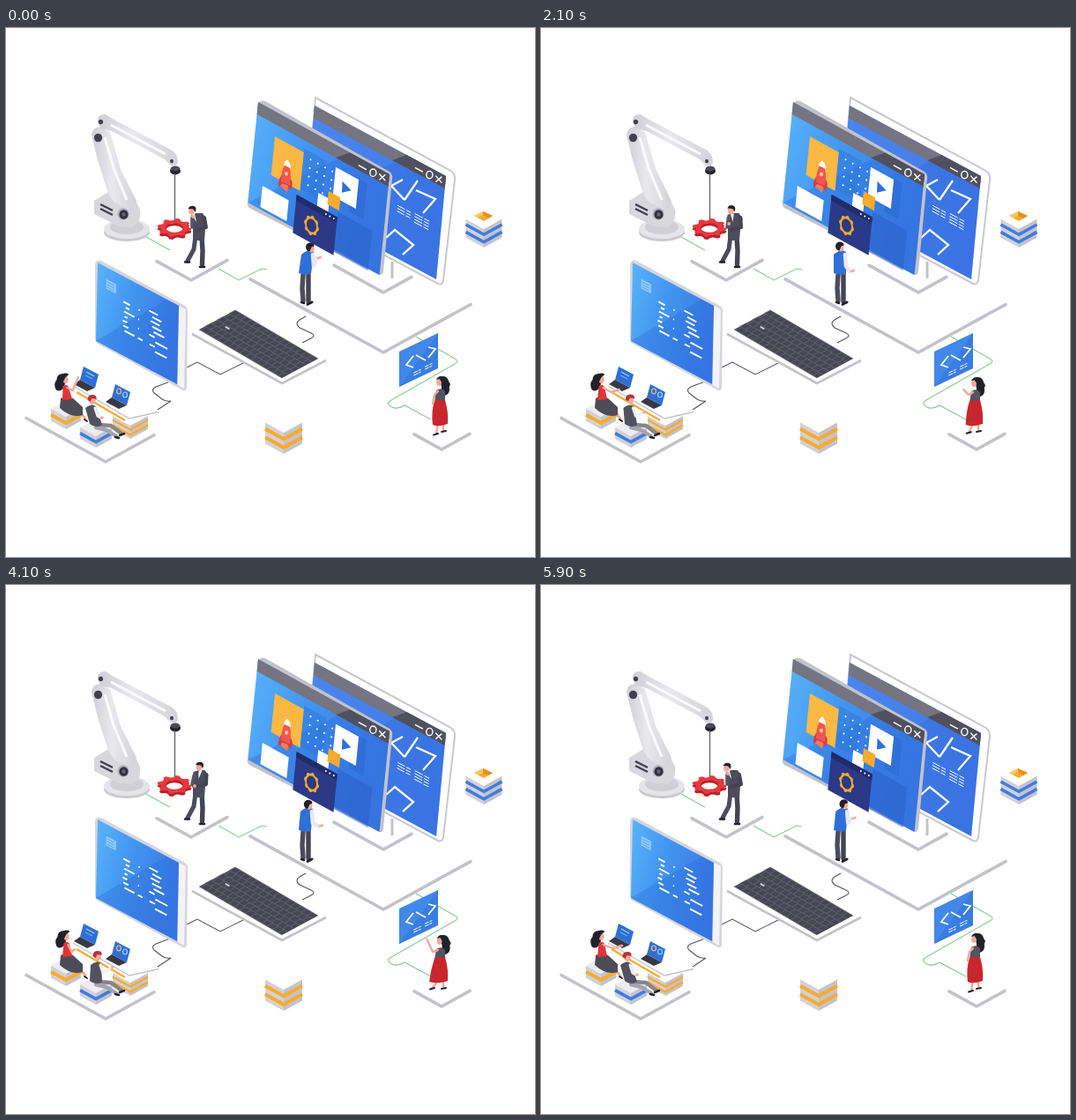
An HTML page that plays this animation: 600x600 px, repeating every 6000 ms.

```html
<!DOCTYPE html>
<html lang="en">
<head>
<meta charset="utf-8">
<title>Isometric workshop</title>
<style>
html,body{margin:0;width:100%;height:100%;overflow:hidden;background:#fff}
svg{display:block;width:100vw;height:100vh}
</style>
</head>
<body>
<svg viewBox="0 0 600 600" xmlns="http://www.w3.org/2000/svg">
<defs>
<linearGradient id="screen" x1="0" y1="0" x2="1" y2=".4"><stop offset="0" stop-color="#5ab4fb"/><stop offset=".5" stop-color="#4193ef"/><stop offset="1" stop-color="#3c7ae6"/></linearGradient>
<linearGradient id="rear"><stop offset="0" stop-color="#4a86ec"/><stop offset="1" stop-color="#4379e8"/></linearGradient>
<linearGradient id="arm"><stop offset="0" stop-color="#cfced6"/><stop offset=".45" stop-color="#e8e8ed"/><stop offset="1" stop-color="#d3d2d9"/></linearGradient>
</defs>
<g id="back"></g><g id="live"></g>
</svg>
<script>
const DARK = '#42414f', SUIT = '#4d4c5c', GREY = '#c3c2ca', WHITE = '#fff', SKIN = '#f3a999', HAIR = '#22212b', ORANGE = '#f8ab2c', BLUE = '#3f7de0';

const poly = (pts, fill, extra = '') => `<polygon points="${pts}" fill="${fill}" ${extra}/>`;
const line = (pts, color, w = 1, extra = '') =>
  `<polyline points="${pts}" fill="none" stroke="${color}" stroke-width="${w}" ${extra}/>`;
const limb = (pts, color, w) => line(pts, color, w, 'stroke-linecap="round" stroke-linejoin="round"');
const path = (d, fill, extra = '') => `<path d="${d}" fill="${fill}" ${extra}/>`;
const oval = (x, y, rx, ry, fill, extra = '') => `<ellipse cx="${x}" cy="${y}" rx="${rx}" ry="${ry}" fill="${fill}" ${extra}/>`;
const ring = (x, y, rx, ry, color, w) => oval(x, y, rx, ry, 'none', `stroke="${color}" stroke-width="${w}"`);
const wire = (d, color) => path(d, 'none', `stroke="${color}" stroke-width="1.1"`);
const range = (n, f) => Array.from({length: n}, (_, i) => f(i)).join('');

// Slanted surface: maps u, v in 0..1 to the stage
const plane = (x, y, ux, uy, vx, vy) => (u, v) => [x + ux * u + vx * v, y + uy * u + vy * v];
const rect = (at, u, v, w, h, fill, extra) =>
  poly([at(u, v), at(u + w, v), at(u + w, v + h), at(u, v + h)], fill, extra);
const dash = (at, u, v, w, size, color = WHITE) => line([at(u, v), at(u + w, v)], color, size);

function random(seed) {
  return () => (seed = seed * 16807 % 2147483647) / 2147483647;
}

// Front edge of a floor tile: corner x, y with arms to both sides
const floor = (x, y, left, right, w = 3.6) =>
  limb([x - left, y - left * .55, x, y, x + right, y - right * .55], GREY, w);

// x, y is the front corner of the top face
function cube(x, y, w, h, color, bands, top = WHITE) {
  const k = w * .55, n = bands * 2 + 1;
  return poly([x - w, y - k, x, y - 2 * k, x + w, y - k, x, y], top) +
    poly([x - w, y - k, x, y, x, y + h, x - w, y - k + h], '#d2d1d9') +
    poly([x, y, x + w, y - k, x + w, y - k + h, x, y + h], '#c4c3cc') +
    range(bands, i => {
      const v = y + h * (2 * i + 1.5) / n;
      return line([x - w, v - k, x, v, x + w, v - k], color, h / n * .85);
    });
}

function gear(x, y, rx, ry, notch, hole, fill, tilt = 0) {
  const n = 32;
  const loop = radius => 'M' + Array.from({length: n}, (_, i) => {
    const a = (i + .5) / n * 2 * Math.PI, r = radius(i), dx = Math.cos(a) * rx * r;
    return `${x + dx} ${y + Math.sin(a) * ry * r + dx * tilt}`;
  }).join('L') + 'Z';
  return path(loop(i => i % 4 < 2 ? 1 : notch) + loop(() => hole), fill, 'fill-rule="evenodd"');
}

function robot() {
  return oval(137, 232, 26, 10, '#cbcad2') + oval(137, 228, 26, 11, '#e4e4e9') + oval(137, 226, 19, 8, '#d0cfd7') +
    path('M100 196L116 186 146 194 152 206Q154 221 143 226L128 225 100 211Z', '#d8d7de') +
    path('M97 121Q98 113 106 112L118 118 130 160 148 196 143 208 123 198 116 188 104 150Z', 'url(#arm)') +
    line([112, 124, 122, 159, 137, 195], '#fafafc', 3) +
    line([107, 200, 121, 207], DARK, 2.4) + line([107, 205, 121, 212], DARK, 2.4) +
    oval(133, 211, 6.5, 6.8, '#b0afbb') + oval(133.5, 211.5, 5, 5.3, '#33323e') + oval(133.5, 211.5, 2, 2.2, '#676674') +
    path('M104 106Q104 97 113 98L121 103 187 138Q195 142 195 153 192 158 187 156L180 149 120 117 107 114Z', 'url(#arm)') +
    line([119, 110, 181, 143], '#fafafc', 3) +
    oval(104.5, 124.5, 4.6, 4.8, DARK) + oval(107.5, 106.5, 2.6, 2.8, DARK) + oval(188, 151, 2, 2.3, DARK) +
    oval(192, 162, 6, 4.4, '#24232d') + oval(192, 159.5, 5.4, 3, '#4a4957') +
    line([191.5, 165, 191.5, 219], '#5a5965', 1.2) +
    gear(191, 229.5, 19.5, 10.5, .8, .5, '#b9202a') + gear(191, 226.5, 19.5, 10.5, .8, .5, '#e6393f');
}

// Title bar, gloss and the minimise, maximise and close marks
function browser(at, fill, gloss) {
  const [ox, oy] = at(.88, .07), [cx, cy] = at(.95, .065);
  return rect(at, 0, 0, 1, 1, fill) +
    poly([at(.7, 0), at(1, 0), at(1, 1), at(0, 1)], '#2a68d6', `opacity="${gloss}"`) +
    rect(at, 0, 0, 1, .12, '#757480') + poly([at(.7, 0), at(1, 0), at(1, .12), at(.6, .12)], '#50505e') +
    dash(at, .77, .075, .06, 1.5) + ring(ox, oy, 3.6, 4.2, WHITE, 1.4) +
    path(`M${cx - 3.5} ${cy - 4}l7 8m0-7l-7 6`, 'none', 'stroke="#fff" stroke-width="1.4"');
}

const smallText = (at, u, v, w, rows, gap) =>
  range(rows, i => dash(at, u, v + i * gap, w * .55, 1) + dash(at, u + w * .65, v + i * gap, w * .35, 1));

function rearMonitor() {
  const at = plane(350, 88, 149, 80, -11, 117);
  return path('M351 79L503 161Q510 165 509 172L496 286Q495 292 490 290L340 210Z', WHITE, 'stroke="#c9c8d0" stroke-width="2"') +
    browser(at, 'url(#rear)', .35) +
    line([450, 172, 437, 179, 452, 195], WHITE, 2.3) + line([452, 195, 467, 173], WHITE, 2.3) +
    line([465, 184, 487, 194, 473, 210], WHITE, 2.3) +
    smallText(at, .67, .51, .1, 3, .027) + smallText(at, .8, .5, .11, 4, .027) +
    line([431, 238, 441, 229, 462, 246, 450, 257], WHITE, 2.3);
}

function frontMonitor() {
  const at = plane(286, 84, 149, 82, -11.5, 114), shade = 'opacity=".5"';
  return line([438, 265, 438, 284], GREY, 3) + floor(428, 300, 56, 32) +
    path('M286 87Q288 81 294 83L435 163Q439 166 438 171L428 276Q427 282 421 279L276 204Q273 202 274 198Z', GREY) +
    browser(at, 'url(#screen)', .35) +
    rect(at, .366, .2, .17, .4, '#2d78dc', shade) + rect(at, .735, .2, .11, .36, '#2a66cf', shade) +
    rect(at, .655, .62, .26, .4, '#285fc7', shade) +
    rect(at, .146, .236, .22, .385, '#fbb843') +
    range(16, i => oval(...at(.42 + i % 4 * .055, .27 + (i >> 2) * .085), 1, 1.1, WHITE)) +
    rect(at, .607, .21, .175, .29, WHITE) + poly([at(.665, .31), at(.735, .35), at(.67, .42)], '#2f70dd') +
    rect(at, .092, .767, .2, .21, WHITE) +
    rect(at, .5, .543, .085, .13, WHITE) + rect(at, .573, .474, .09, .13, ORANGE) +
    rect(at, .345, .673, .31, .38, '#2b3986') + rect(at, .345, .673, .31, .06, '#202c6c') +
    range(3, i => oval(...at(.57 + i * .03, .705), 1, 1.1, WHITE));
}

function leftScreen() {
  const at = plane(104, 266, 92, 49, -2, 89), rnd = random(12);
  return path('M101 268Q102 262 108 264L203 315Q206 317 206 321L205 408Q204 413 199 410L104 358Q101 356 101 352Z', '#d6d5dd') +
    poly([196, 315, 204, 319, 202, 409, 195, 405], '#f3f3f7') +
    rect(at, 0, 0, 1, 1, 'url(#screen)') +
    poly([at(.85, 0), at(1, 0), at(1, 1), at(0, 1)], '#2a6bd8', 'opacity=".35"') +
    rect(at, .11, .15, .12, .12, '#a9d5ff', 'opacity=".75"') +
    range(3, i => dash(at, .12, .18 + i * .033, .09, .8, '#4a9cf3')) +
    range(9, i => {
      const v = .26 + i * .06;
      return dash(at, .64 + rnd() * .1, v, .05 + rnd() * .1, 1.9) +
        (i < 7 ? dash(at, .32 + rnd() * .06, v + .06, .03 + rnd() * .1, 1.9) : '') +
        (i % 2 ? dash(at, .51, v, .1 * rnd(), 1.9) : '');
    });
}

function keyboard() {
  const at = plane(260, 320, 94, 55, -41, 22);
  return line([211, 347, 313, 403, 363, 377], GREY, 2.6) + rect(at, 0, 0, 1, 1, '#474653') +
    range(7, r => line([at(0, r / 6), at(1, r / 6)], '#6b6a77', .7)) +
    range(90, i => {
      const r = i % 6, u = (i / 6 | 0) / 15 + r % 2 * .02;
      return line([at(u, r / 6), at(u, (r + 1) / 6)], '#6b6a77', .7);
    }) + dash(at, .12, .55, .05, 1.6, '#d9d8df');
}

// x, y is the top left corner of the lid
function laptop(x, y) {
  const at = plane(x, y, 17, 9, -4, 15);
  return poly([at(0, 1), at(1, 1), [x + 4, y + 28], [x - 11, y + 20]], '#393845') + rect(at, 0, 0, 1, 1, '#2f6fd4');
}

function desk() {
  return cube(141, 451, 20, 15, ORANGE, 2) +
    poly([76, 405, 95, 397, 173, 435, 141, 447], WHITE) + line([80, 413, 135, 445], ORANGE, 2.2) +
    line([76, 406, 140, 443, 173, 435.5], GREY, 1.4) +
    laptop(88, 384) + line([91, 390, 100, 395], '#9fd0ff', 1.2) + line([90, 394, 98, 398], '#7db9f5') +
    laptop(124, 404) + ring(128, 412, 2.4, 3, '#e9c27b', 1.2) + ring(135, 416, 2.4, 3, '#9fd0ff', 1.2);
}

function panel() {
  const at = plane(446, 367, 44, -21, 0, 40);
  return rect(at, 0, 0, 1, 1, '#4288ea') + poly([at(1, 0), at(1, 1), at(0, 1)], '#2b6bd4', 'opacity=".4"') +
    line([462, 372, 454, 382, 462, 385], WHITE, 1.8) + line([465, 371, 476, 377], WHITE, 1.8) +
    line([479, 362, 487, 364, 479, 374], WHITE, 1.8) +
    smallText(at, .37, .8, .19, 2, .07) + smallText(at, .66, .78, .19, 2, .07);
}

function scenery() {
  const GREEN = '#86cb95', INK = '#55545f';
  return wire('M159 237L186 252M241 273L264 286 290 273 296 274', GREEN) +
    floor(210, 286, 39, 41) + floor(428, 368, 151, 99) + floor(113, 492, 90, 55) + floor(494, 478, 31, 32) +
    wire('M465 350L509 375Q515 378 509 381L437 422Q430 426 438 430 443 433 452 428L482 444', GREEN) +
    wire('M205 385L217 379 243 393 269 380', INK) +
    wire('M340 327L333 331Q327 335 333 340L346 346Q352 349 346 352L336 357', INK) +
    wire('M186 401L170 407Q164 410 168 414L177 421Q182 424 187 423L172 433', INK) +
    robot() + rearMonitor() + frontMonitor() + leftScreen() + keyboard() + desk() +
    cube(68, 441, 17, 14, ORANGE, 1, '#ededf1') + cube(102, 463, 18, 13, BLUE, 1, '#ededf1') +
    cube(315, 459, 21, 24, ORANGE, 2) + panel();
}

const CYCLE = 3000;
function ramp(t, from, to) {
  const u = Math.min(1, Math.max(0, (t - from) / (to - from)));
  return u * u * (3 - 2 * u);
}

// Shared beats of the gestures, each 0..1
function beats(t) {
  t %= CYCLE;
  const leave = ramp(t, 1600, 2700), begin = ramp(t, 0, 600), next = ramp(t, 600, 1400);
  return {
    act: begin - leave,
    reach: next - leave,
    lean: begin - next,
    rise: 1 - begin + ramp(t, 2700, 3000),
    wave: 1 - begin + ramp(t, 2900, 3000),
    type: ramp(t, 600, 2700) - ramp(t, 2900, 3000)
  };
}

function boss({act}) {
  const x = 211 + 8.5 * act, y = 206 - act, sx = 218 + 2.5 * act, hx = 212 + 2 * act, hy = 214 + 14 * act;
  return limb([215, 236, 213, 251, 206, 264], SUIT, 5) + limb([222, 236, 223, 253, 222.5, 268], '#454453', 5.4) +
    limb([203, 265.5, 208, 265.5], HAIR, 2.4) + limb([220, 271, 225, 271], HAIR, 2.6) +
    poly([sx - 8, 212, sx - 2, 210, sx + 5, 210, sx + 9, 216, 226, 228, 225, 242, 212, 240, 212, 226], SUIT) +
    poly([x - 1, y + 5, x + 3, y + 5, sx - 2, 220], WHITE) +
    limb([sx + 7, 215, 227, 226, 216, 229], '#454453', 4) + limb([sx - 7, 215, 211, 226, hx, hy + 2], '#565565', 3.6) +
    oval(hx, hy, 1.9, 2, SKIN) + oval(x - .6, y + 1.5, 3.2, 4.2, SKIN) +
    path(`M${x - 4.5} ${y - 1}q2-4.500 7-3 3.500 2 1 7l-2-3.500z`, HAIR);
}

function maker({lean, rise}) {
  const x = 339 + 12 * lean + 6 * rise, y = 247 + 4 * lean + rise, sx = 340 + (x - 339) * .5;
  const hx = 355 + 13 * lean + 2 * rise, hy = 275 - 8 * lean - 15 * rise;
  return limb([337, 280, 336, 295, 337, 309], SUIT, 5.4) + limb([343, 280, 343, 296, 343, 310], '#454453', 5.4) +
    limb([335, 311, 338, 312], HAIR, 2.6) + limb([342, 313.5, 347, 311], HAIR, 2.8) +
    path(`M${sx - 8} 257Q${sx} 250 ${sx + 6} 254L346 279Q339 281 332 278Z`, '#2f6fd8') +
    limb([sx + 5, 257, sx + 6, 270, hx - 5, hy + 1], '#e8e8f2', 4.6) + limb([hx - 3, hy + 1, hx, hy], SKIN, 2.6) +
    oval(x + 1, y + 2, 3.6, 4.4, SKIN) + path(`M${x - 5} ${y}q1-5 6-4.500 4 1 3.500 4l-3 1-2 5q-4 0-4.500-5z`, HAIR);
}

function coder({act, reach, lean}) {
  const x = 493 + 2 * lean, y = 401 + 2 * act, hx = 484 - 4 * act - 4 * reach, hy = 426 - 16 * act - 12 * reach;
  const lx = 488 - 4 * act, ly = 460 - 3 * act;
  return limb([490, 448, lx, ly], SKIN, 2.4) + limb([496, 448, 496, 456], SKIN, 2.4) +
    limb([lx - 3, ly + 1.5, lx + 2, ly], HAIR, 2) + limb([494, 458, 499, 457], HAIR, 2) +
    path(`M${x - 2} ${y - 5}q7-3 10 2 1 3 3 6-2 3-1 6 0 5-5 7-5-1-4-10z`, HAIR) +
    path(`M488 ${y + 10}Q494 ${y + 6} 498 ${y + 11}L498 425 486 425Z`, '#55535f') +
    path(`M486 423L498 422Q502 436 501 449 490 453 ${484 - 4 * act} 450 482 436 486 423Z`, '#c9252d') +
    limb([490, y + 11, 486 - 2 * act, 416, hx, hy], SKIN, 2.4) +
    oval(x - 2, y + 1, 2.9, 4, SKIN) + path(`M${x - 5} ${y - 2}q3-6 8-3l1 6q-4 0-5-4z`, HAIR);
}

function girl({wave, type}) {
  const x = 66.5 - wave, y = 398, hx = 76 + 6 * wave + 16 * type, hy = 414 - 18 * wave - 5 * type;
  return limb([84, 436, 90, 443], SKIN, 3) + limb([89, 444, 92, 446], HAIR, 2) +
    path(`M${x} ${y - 6}q-8 0-8 7-4 4-1 11 4 4 9-2l4-12z`, HAIR) +
    path('M62 420Q69 416 76 420L87 430 87 439Q74 443 61 431Z', '#4d4b58') +
    path(`M${x - 1} 406Q${x + 5} 403 ${x + 6} 409L75 421 64 422Z`, '#df3538') +
    limb([x + 4, 408, (x + hx) / 2 + 2, Math.max(hy + 3, 411), hx, hy], SKIN, 2.4) +
    oval(x + 2, y + 1, 3, 4, SKIN) + path(`M${x - 4} ${y - 2}q4-7 10-3l-4 3-3 6z`, HAIR);
}

function boy({act, reach}) {
  const x = 97 + 6 * act, y = 421 - act, hx = 108 + 7 * act + 7 * reach, hy = 442 - 4 * act - 7 * reach;
  return limb([104, 450, 119, 451, 131, 460], '#85848f', 4.4) + limb([102, 453, 114, 456, 125, 463], '#a5a4ae', 4.4) +
    limb([124, 464, 128, 465], HAIR, 2.6) + limb([129, 462, 134, 460], HAIR, 2.6) +
    path(`M${x - 7} 431Q${x} 425 ${x + 5} 429L109 450Q102 455 95 449Z`, '#52515f') +
    limb([x + 4, 431, x + 7, 440, hx, hy], '#f0eff5', 3.2) + oval(hx + 1, hy, 1.8, 1.7, SKIN) +
    oval(x + 1, y + 1.5, 3.6, 4.4, SKIN) + path(`M${x - 4.5} ${y + 1}q0-6 5-6 6 0 5 5l-5-1-2 4z`, '#b8343c');
}

function rocket(t) {
  const y = 1.3 * (1 - Math.cos((t / CYCLE + .1) * 2 * Math.PI));
  return `<g transform="translate(0 ${y})">` + path('M312 180Q313 171 317 171 322 174 319 186Z', '#f27b50') +
    path('M309 181Q308 170 314 166L322 170Q327 175 323 184L319 178 313 176Z', '#d83b42') +
    path('M319 152Q325 161 322 178L312 174Q312 158 319 152Z', '#f0564f') +
    path('M319 149Q323 153 323 159L315 155Q316 151 319 149Z', WHITE) + oval(318, 165, 2, 2.3, '#ffc6a8') + '</g>';
}

function openCube(t) {
  const y = 212 + 1 - Math.cos(t / CYCLE * 2 * Math.PI);
  return cube(542, 228, 20.5, 21, BLUE, 2) + poly([531, 213, 541, 208, 552, 213, 542, 219], ORANGE) +
    poly([531, 213, 541, 208, 541, y, 535, 215], '#fbc963') + poly([541, 208, 552, 213, 547, 216, 541, y], '#e4921c');
}

const live = document.getElementById('live');
document.getElementById('back').innerHTML = scenery();

function draw(now) {
  const t = Math.floor(now % (2 * CYCLE) / 100) * 100, b = beats(t);
  live.innerHTML = rocket(t) + gear(346.5, 224, 8.5, 11.5, .87, .65, ORANGE, .3) +
    openCube(t) + boss(b) + maker(b) + coder(b) + girl(b) + boy(b);
}

const start = performance.now();
function tick() {
  draw(performance.now() - start);
  requestAnimationFrame(tick);
}
tick();
</script>
</body>
</html>
```
